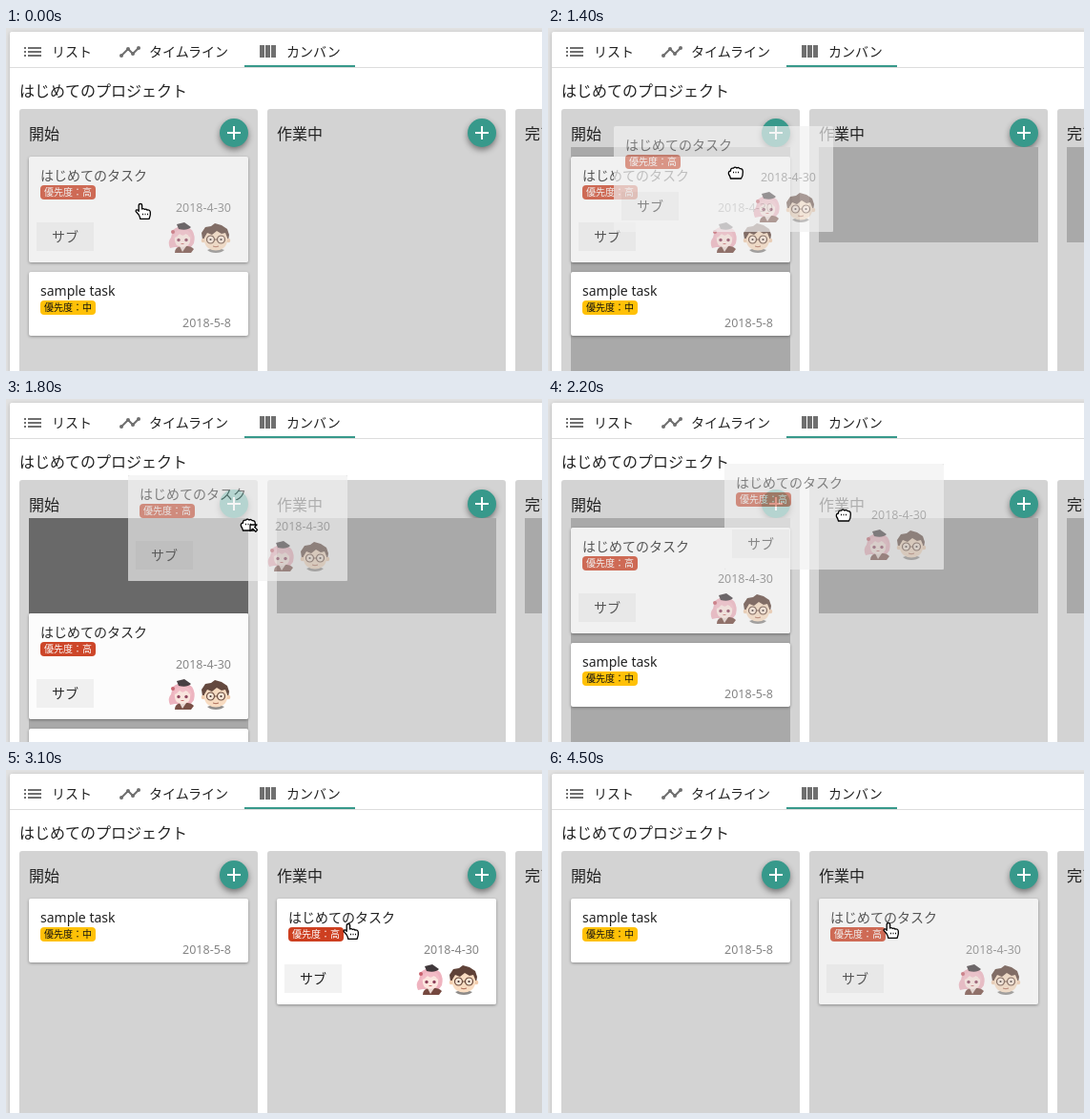
Write an HTML page that moves like this. It is 562x360 px and loops after 5800 ms.

```html
<!DOCTYPE html>
<html lang="ja">
<head>
<meta charset="utf-8">
<title>カンバン</title>
<style>
  html, body { margin: 0; width: 100%; height: 100%; overflow: hidden; background: #e2e2e2; }
  svg { display: block; width: 562px; height: 360px; }
  text { font: 350 14px "Noto Sans", "Noto Sans CJK JP", "Noto Sans CJK", sans-serif; fill: #222; }
  .head { font-size: 16px; }
  .date { font-size: 12.5px; fill: #858585; text-anchor: end; }
  .badge { font-size: 10px; }
  .icon { fill: #6f6f6f; }
  .panel { fill: #fff; filter: drop-shadow(0 1px 2px rgba(0,0,0,.2)); }
  .card { filter: drop-shadow(0 1px 1.5px rgba(0,0,0,.35)); }
  .fab { fill: #37998b; filter: drop-shadow(0 3px 3px rgba(0,0,0,.45)); }
  .cursor { fill: #fff; stroke: #000; stroke-width: 1.3; stroke-linejoin: round; }
</style>
</head>
<body>
<svg id="stage" viewBox="0 0 562 360"></svg>
<script>
const DURATION = 5800, STEP = 100;
const COLUMNS = [[14, '開始'], [274, '作業中'], [534, '完了']];

// time, dragged card x and y, grabbing cursor x and y
const DRAG = [
  [1100, 28, 131, 152, 184],
  [1400, 69, 103, 197, 152],
  [1600, 99, 88, 226, 139],
  [1800, 128, 80, 254, 132],
  [2100, 172, 67, 297, 121],
  [2200, 185, 68, 310, 122],
  [2400, 218, 85, 342, 143],
  [2500, 218, 85, 342, 143],
  [2600, 237, 105, 361, 166],
  [2800, 242, 112, 366, 173]
];
const DROP = 3100;

const rect = (x, y, w, h, fill, more = '') =>
  `<rect x="${x}" y="${y}" width="${w}" height="${h}" fill="${fill}" ${more}/>`;
const text = (x, y, str, cls = '', more = '') =>
  `<text x="${x}" y="${y}" class="${cls}" ${more}>${str}</text>`;
const dot = (x, y, r, fill, more = '') => `<circle cx="${x}" cy="${y}" r="${r}" fill="${fill}" ${more}/>`;
const path = (d, more = '') => `<path d="${d}" ${more}/>`;

const girl = `<g transform="translate(161 85)">
  ${path('M-10-8Q0-16 10-8Q14-2 12 6L9 10H-8L-13 11Q-16 4-12 0Z', 'fill="#efb3bf"')}
  ${path('M-8 16Q-8 9 0 9Q8 8 12 12L9 16Z', 'fill="#75483f"')}
  ${path('M-3 9L0 15L4 9Z', 'fill="#e8d5d0"')}
  ${path('M-8-2Q0-7 8-2Q9 5 6 8Q0 12-6 8Q-9 4-8-2Z', 'fill="#fce6df"')}
  ${path('M-10 1Q-8-9 0-8Q9-9 10 1Q6-1 4-5Q1 0-3-4Q-6 0-10 1Z', 'fill="#f3bcc6"')}
  ${path('M-6-14L2-16L9-11Q5-7-4-9Z', 'fill="#40383b"')}
  ${dot(-10, -6, 2, '#c8606c')}
  ${dot(-4, 2.5, 1.7, '#8d405a')}${dot(4, 2.5, 1.7, '#8d405a')}
  ${path('M-1.5 6.5H1.5', 'stroke="#c66c6c"')}</g>`;

const lens = x => dot(x, 2, 4, '#fbe8d8', 'stroke="#6a4a3c" stroke-width="1.2"') + dot(x, 2, 1.1, '#3f302e');
const man = `<g transform="translate(196 85)">
  ${path('M-9 13Q0 9 9 13Q6 16 0 16Q-6 16-9 13Z', 'fill="#8d8a88"')}
  ${path('M-14 2L-15-5L-11-11L-5-12L-1-15L6-13L12-9L14-3L13 3Z', 'fill="#5f4238"')}
  ${dot(-13, 3, 2.3, '#f2cdae')}${dot(13, 3, 2.3, '#f2cdae')}
  ${path('M-12 0L-9-5L-4-3L1-7L6-4L10-5L12 0Q13 7 8 11Q0 16-8 11Q-13 7-12 0Z', 'fill="#f9dcc1"')}
  ${lens(-5.5)}${lens(5.5)}${path('M-1.5 2h3', 'stroke="#6a4a3c"')}
  ${path('M-3 9Q0 10.5 3 9', 'fill="none" stroke="#ad6a55"')}</g>`;

const cardBody = (h, title, level, color, ink, date) =>
  rect(0, 0, 230, h, '#fff', 'rx="2"') +
  text(12, 25, title) +
  rect(12, 30, 58, 15, color, 'rx="4"') +
  text(16, 41.3, '優先度：' + level, 'badge', `style="fill:${ink}"`) +
  text(212, 58, date, 'date');

const column = ([x, name]) =>
  rect(x, 85, 250, 290, '#d3d3d3', 'rx="3"') +
  text(x + 10, 117, name, 'head') +
  dot(x + 225, 110, 15, '#37998b', 'class="fab"') +
  path(`M${x + 218} 110h14m-7-7v14`, 'stroke="#fff" stroke-width="2"');

const zone = ([x], i) => rect(x + 10, 125, 230, i ? 100 : 250, '#a9a9a9');

const stage = document.getElementById('stage');
stage.innerHTML = `
  <defs><g id="task">
    ${cardBody(111, 'はじめてのタスク', '高', '#cd3f20', '#fff', '2018-4-30')}
    ${rect(8, 69, 60, 30, '#f2f2f2')}${text(24, 89, 'サブ')}${girl}${man}
  </g></defs>
  ${rect(0, 0, 562, 360, '#e2e2e2')}
  <rect class="panel" x="4" y="4" width="570" height="370" rx="2"/>
  ${rect(4, 41, 558, 1, '#dcdcdc')}
  ${rect(250, 39, 116, 2, '#37998b')}
  <g class="icon">
    ${path('M19 20h2v2h-2zm0 4h2v2h-2zm0 4h2v2h-2zM23 20h14v2H23zm0 4h14v2H23zm0 4h14v2H23z')}
    ${path('M121 29l7-7 5 5 6-6', 'fill="none" stroke="#6f6f6f" stroke-width="2"')}
    ${[[121, 29], [128, 22], [133, 27], [139, 21]].map(p => dot(...p, 2, '#6f6f6f')).join('')}
    ${path('M266 18h5v13h-5zm6 0h5v13h-5zm6 0h5v13h-5z')}
  </g>
  ${text(48, 30, 'リスト')}${text(150, 30, 'タイムライン')}${text(294, 30, 'カンバン')}
  ${text(14, 72, 'はじめてのプロジェクト', 'head')}
  ${COLUMNS.map(column).join('')}
  <g id="zones">${COLUMNS.map(zone).join('')}</g>
  ${rect(0, 125, 230, 100, '#696969', 'id="slot"')}
  <g id="main">
    ${rect(0, 0, 230, 111, '#d3d3d3', 'rx="2" class="card"')}
    <use id="face" href="#task"/>
  </g>
  <g id="sample" class="card">
    ${cardBody(67, 'sample task', '中', '#ffc107', '#111', '2018-5-8')}
  </g>
  <g id="ghost" opacity=".68">
    ${rect(0, 0, 230, 111, '#d3d3d3')}<use href="#task" opacity=".7"/>
  </g>
  <g id="hand" class="cursor">
    ${path('M-1.8 11L-4.8 7.6Q-5 5.4-3 6L-1.8 7.2V.8Q-1.6-.5 0-.5Q1.5-.5 1.6.8V5Q3.2 4.2 4.4 5.4Q6 4.6 7 6Q9.8 5.4 10.3 8V11Q10 13 9 15.4H-.2Q-.6 13-1.8 11Z')}
    ${path('M2 10.5h1m1.5 0h1m1.5 0h1')}
  </g>
  <g id="fist" class="cursor">
    ${path('M-5.5 6Q-6 3.5-7.5 1.5Q-8.3-1.5-5.5-2Q-5.5-5.5-2.5-4.8Q-1-6.8 1-5Q3-6.3 4.2-4.3Q7.3-4.8 7.3-1Q7.5 3 5.5 6Z')}
    ${path('M-3-.5h1m1.5 0h1m1.5 0h1')}
    ${path('M2 0h7l-2.4 2.4 3 3-1.8 1.8-3-3L2 6.6Z', 'id="arrow"')}
  </g>`;

const el = {};
stage.querySelectorAll('[id]').forEach(n => el[n.id] = n);
const move = (n, x, y) => n.setAttribute('transform', `translate(${x} ${y})`);
const show = (n, on) => n.setAttribute('visibility', on ? 'visible' : 'hidden');

function dragAt(t) {
  const i = DRAG.findIndex(k => k[0] > t);
  if (i < 0) return DRAG[DRAG.length - 1].slice(1);
  const a = DRAG[i - 1], b = DRAG[i], p = (t - a[0]) / (b[0] - a[0]);
  return a.slice(1).map((v, j) => Math.round(v + (b[j + 1] - v) * p));
}

function draw(time) {
  const t = Math.floor(time / STEP) * STEP;
  const dragging = t >= DRAG[0][0] && t < DROP;
  const dropped = t >= DROP;
  const overFirst = t >= 1700 && t < 1900;
  const overSecond = t >= 2300 && t < DROP;
  const shift = overFirst ? 90 : 0;

  show(el.zones, dragging);
  show(el.slot, overFirst || overSecond);
  move(el.slot, overFirst ? 24 : 284, 0);
  move(el.main, dropped ? 284 : 24, 135 + shift);
  move(el.sample, 24, dropped ? 135 : 256 + shift);

  const fade = dropped ? Math.min(1, (t - DROP) / 500) : 1;
  el.face.setAttribute('opacity', overFirst ? 0.95 : 1 - 0.3 * fade);

  show(el.ghost, dragging);
  show(el.fist, dragging);
  show(el.arrow, overFirst || overSecond);
  show(el.hand, !dragging);
  if (dragging) {
    const [x, y, cx, cy] = dragAt(t);
    move(el.ghost, x, y);
    move(el.fist, cx, cy);
  } else if (dropped) {
    move(el.hand, Math.round(359 - 2 * fade), t < 4500 ? 162 : 161);
  } else {
    move(el.hand, 141, 185);
  }
}

function tick() {
  draw(performance.now() % DURATION);
  requestAnimationFrame(tick);
}
tick();
</script>
</body>
</html>
```
